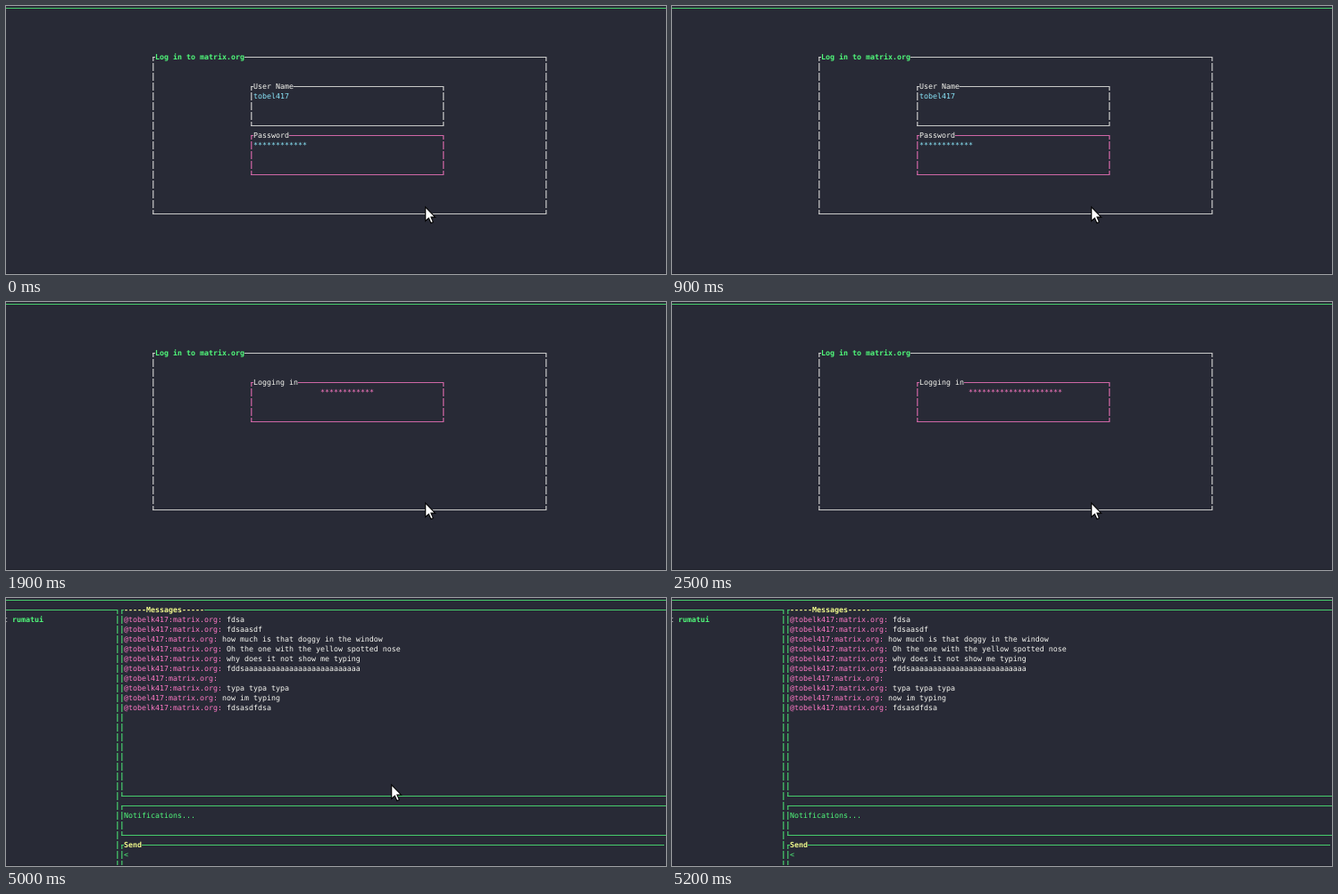
An HTML page for the animation above (5.9 s loop, 739 by 301 pixels).

```html
<!DOCTYPE html>
<html lang="en">
<head>
<meta charset="utf-8">
<title>Terminal chat login</title>
<style>
  html, body { margin: 0; width: 100%; height: 100%; overflow: hidden; background: #282a36; }
  svg { display: block; width: 739px; height: 301px; }
  text {
    font: 8.305px "DejaVu Sans Mono", monospace;
    text-rendering: geometricPrecision;
    white-space: pre;
  }
  .bold { font-weight: 700; }
  .white { fill: #f8f8f2; }
  .green { fill: #50fa7b; }
  .pink { fill: #ff79c6; }
  .cyan { fill: #8be9fd; }
  .yellow { fill: #f1fa8c; }
  .line { opacity: .78; }

  #login, #form, #busy, #chat, #stars, #mouse, .name-box, .pass-box {
    animation: 5900ms step-end infinite;
  }
  #login { animation-name: login; }
  #form { animation-name: form; }
  #busy { animation-name: busy; }
  #chat { animation-name: chat; }
  #stars { animation-name: stars; }
  #mouse { animation-name: mouse; }
  .name-box { animation-name: name-focus; }
  .pass-box { animation-name: pass-focus; }

  @keyframes login { 0% { visibility: visible; } 44.067%, 100% { visibility: hidden; } }
  @keyframes form { 0% { opacity: 1; } 23.728%, 100% { opacity: 0; } }
  @keyframes busy { 0% { opacity: 0; } 23.728%, 100% { opacity: 1; } }
  @keyframes chat { 0% { visibility: hidden; } 44.067%, 100% { visibility: visible; } }
  @keyframes name-focus {
    0%, 15.254%, 100% { fill: #f8f8f2; }
    11.864% { fill: #ff79c6; }
  }
  @keyframes pass-focus {
    0%, 15.254%, 100% { fill: #ff79c6; }
    11.864% { fill: #f8f8f2; }
  }
  /* The row of stars grows from its middle, one 5px cell at a time. */
  @keyframes stars {
    0%, 23.728% { clip-path: inset(0 45px 0 45px); }
    25.423% { clip-path: inset(0 40px 0 40px); }
    27.118% { clip-path: inset(0 35px 0 35px); }
    28.813% { clip-path: inset(0 30px 0 25px); }
    32.203% { clip-path: inset(0 25px 0 20px); }
    33.898% { clip-path: inset(0 20px 0 15px); }
    37.288% { clip-path: inset(0 15px 0 10px); }
    38.983% { clip-path: inset(0 10px 0 5px); }
    40.677% { clip-path: inset(0 5px 0 5px); }
    42.372%, 100% { clip-path: inset(0 0 0 0); }
  }
  @keyframes mouse {
    0% { transform: translate(469px, 225px); visibility: visible; }
    84.745% { transform: translate(431px, 209px); visibility: visible; }
    86.44% { transform: translate(405px, 171px); visibility: visible; }
    88.135%, 100% { transform: translate(405px, 171px); visibility: hidden; }
  }
</style>
</head>
<body>
<svg id="stage" viewBox="0 0 739 301"></svg>
<script>
  const CELL = 5, ROW = 11;

  const text = (x, y, str, cls) => `<text x="${x}" y="${y + 3}" class="${cls}">${str}</text>`;
  const hline = (x1, x2, y) => `M${x1} ${y}H${x2}v1H${x1}z`;
  const vline = (x, y1, y2) => `M${x + .2} ${y1}h1.2V${y2}h-1.2z`;
  const path = (d, cls) => `<path class="line ${cls}" d="${d}"/>`;

  // One bar per text row, with the small gap between rows.
  function bars(x, top, bottom) {
    let d = "";
    for (let y = top; y <= bottom; y += ROW) d += vline(x, y - 4, y + 5);
    return d;
  }

  function side(x, top, bottom) {
    return vline(x, top, top + 5) + bars(x, top + ROW, bottom - ROW) + vline(x, bottom - 4, bottom + 1);
  }

  function box(x, top, right, bottom, cls, title = "", titleCls = "white", closed = true) {
    const start = x + 3;
    let d = side(x, top, bottom) + hline(x, right + 1, bottom);
    d += hline(x, start, top) + hline(start + title.length * CELL, right + 1, top);
    if (closed) d += side(right, top, bottom);
    return path(d, cls) + text(start, top, title, titleCls);
  }

  const shortUser = "@tobel417:matrix.org:";
  const longUser = "@tobelk417:matrix.org:";
  const messages = [
    [longUser, "fdsa"],
    [longUser, "fdsaasdf"],
    [shortUser, "how much is that doggy in the window"],
    [longUser, "Oh the one with the yellow spotted nose"],
    [longUser, "why does it not show me typing"],
    [longUser, "fdds" + "a".repeat(26)],
    [shortUser, ""],
    [longUser, "typa typa typa"],
    [shortUser, "now im typing"],
    [longUser, "fdsasdfdsa"]
  ];

  const login = `<g id="login">
    ${box(164, 57, 604, 233, "white", "Log in to matrix.org", "green bold")}
    <g id="form">
      ${box(274, 90, 489, 134, "name-box", "User Name")}
      ${text(277, 101, "tobel417", "cyan")}
      ${box(274, 145, 489, 189, "pass-box", "Password")}
      ${text(277, 156, "*".repeat(12), "cyan")}
    </g>
    <g id="busy">
      ${box(274, 90, 489, 134, "pink", "Logging in")}
      <g id="stars">${text(332, 101, "*".repeat(21), "pink")}</g>
    </g>
  </g>`;

  const rooms = path(hline(0, 125, 13) + vline(124, 13, 18) + bars(124, 24, 299), "green")
    + text(-3, 24, "t", "white") + text(7, 24, "rumatui", "green bold");

  const log = messages.map(([user, body], i) => {
    const y = 24 + i * ROW;
    return text(132, y, user, "pink") + text(132 + (user.length + 1) * CELL, y, body, "white");
  }).join("");

  const send = path(hline(129, 132, 277) + hline(152, 737, 277) + vline(129, 277, 282)
    + bars(129, 288, 299), "green") + text(132, 277, "Send", "yellow bold") + text(132, 288, "&lt;", "green");

  const chat = `<g id="chat">
    ${rooms}
    ${box(129, 13, 739, 222, "green", "-----Messages-----", "yellow bold", false)}
    ${log}
    ${box(129, 233, 739, 266, "green", "", "green", false)}
    ${text(132, 244, "Notifications...", "green")}
    ${send}
  </g>`;

  const mouse = `<path id="mouse" d="M.7 .9V16.4L4.3 13.1 6.8 18.7 9.3 17.6 6.9 12.1H11.6z"
    fill="#fff" stroke="#000" stroke-width="1.1"/>`;

  document.getElementById("stage").innerHTML =
    path(hline(0, 739, 2), "green") + login + chat
    + '<rect y="300" width="739" height="1" fill="#20222c"/>' + mouse;
</script>
</body>
</html>
```
